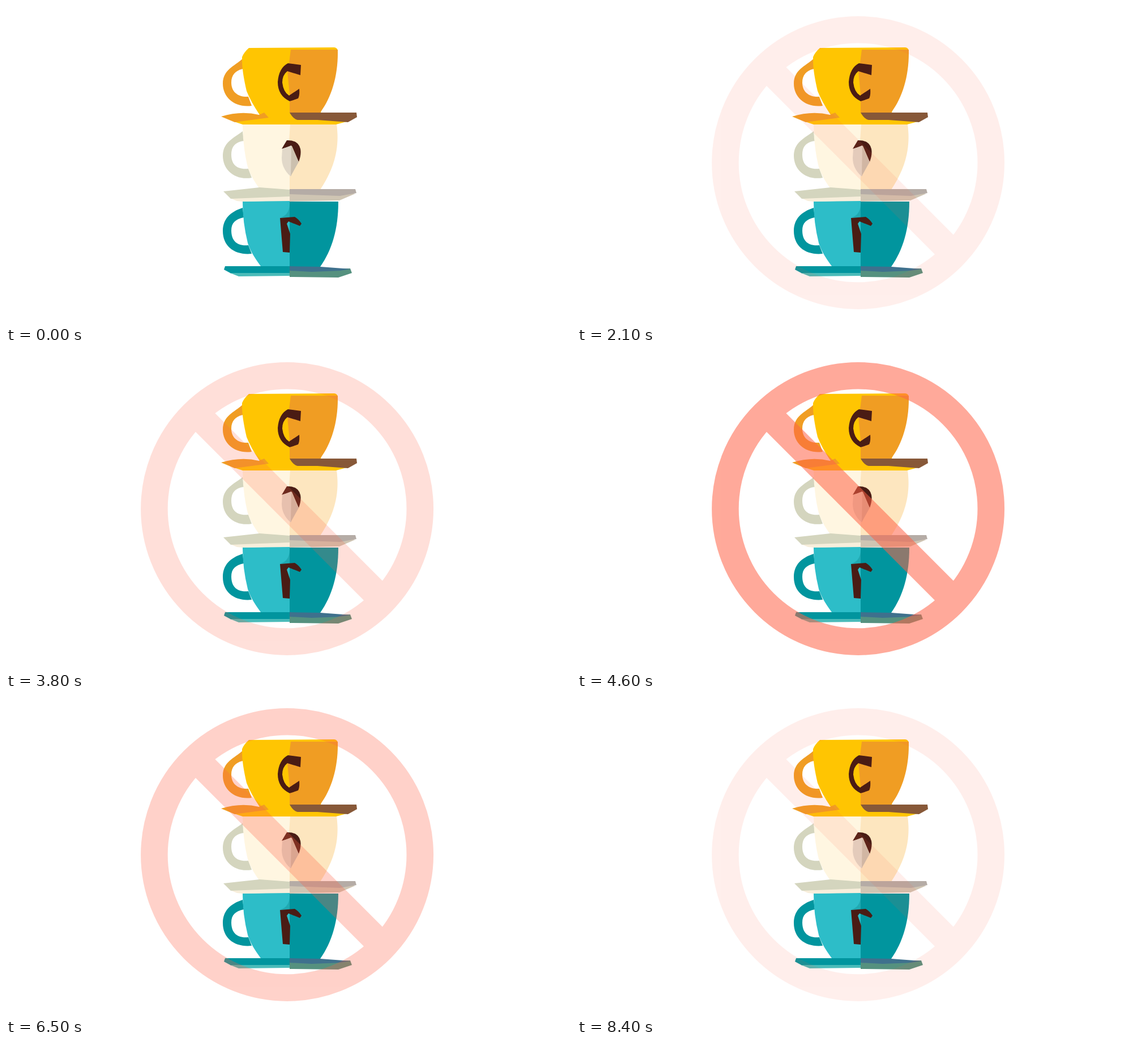
Write an HTML page that moves like this. It is 998 px wide and 561 px high and loops after 8500 ms.

```html
<!DOCTYPE html>
<html lang="en">
<head>
<meta charset="utf-8">
<title>Stacked cups</title>
<style>
  html, body { margin: 0; width: 100%; height: 100%; overflow: hidden; background: #fff; }
  svg { display: block; width: 100%; height: 100%; }
  .orange { fill: #f09d23; }
  .yellow { fill: #ffc502; }
  .sand { fill: #d4d5be; }
  .teal { fill: #01959e; }
  .dark { fill: #4a1c14; }
  #sign { fill: none; stroke: #ff6347; stroke-width: 47.6; opacity: 0; }
</style>
</head>
<body>
<svg viewBox="0 0 998 561">
  <!-- teal cup -->
  <path class="teal" d="M418 356C396 363 383 376 383 397C383 425 405 440 434 437L428 422C408 424 398 414 398 396C398 383 405 376 420 373Z"/>
  <path fill="#2dbdc8" d="M418 345L501 343V459H450Q432 435 427 418Q418 382 418 345Z"/>
  <path fill="#20a9b2" d="M501 350V374L485 373Q500 369 501 350Z"/>
  <path class="teal" d="M501 345H587C587 393 576 430 555 460H501Z"/>
  <path class="dark" d="M484 374L510 372Q517 376 522 384L519 388L499 380L496 384L502 402L501 435L489 434Z"/>
  <path class="teal" d="M387 459H501V472H398L385 465Z"/>
  <path fill="#4abbb9" d="M396 471H501V476L411 477Z"/>
  <path fill="#55917f" d="M501 466L608 463L611 471L587 479L501 478Z"/>
  <path fill="#3f718d" d="M501 459L555 460L609 464L590 467L540 469L501 467Z"/>

  <!-- cream cup -->
  <path class="sand" d="M418 221C404 232 383 240 383 264C383 290 405 308 434 303L428 287C408 289 398 280 398 262C398 248 405 240 420 238Z"/>
  <path fill="#fff6e1" d="M418 209H503V324H449Q430 298 426 280Q418 245 418 209Z"/>
  <path fill="#fde6bf" d="M502 209H584C590 252 579 288 555 324H501V300L504 250L500 238Z"/>
  <path class="dark" d="M496 237Q516 236 520 252Q522 262 517 275L505 247L487 252Z"/>
  <path fill="#e1d8c9" d="M488 252L504 246V300H502Q487 286 487 268Z"/>
  <path fill="#ccc0ae" d="M504 246L517 275L503 300Z"/>
  <path fill="#f7eedb" d="M396 339L501 335V344L418 345L408 344Z"/>
  <path class="sand" d="M384 327L448 320L501 324V336L397 340Z"/>
  <path fill="#cfc5b3" d="M501 331L617 331L589 343L501 345Z"/>
  <path fill="#b5aca6" d="M501 323H617L619 330L590 335L501 332Z"/>

  <!-- yellow cup -->
  <path class="orange" d="M418 93C404 106 383 112 383 137C383 162 405 180 434 176L428 160C410 161 398 152 398 135C398 122 405 114 418 111Z"/>
  <path class="yellow" d="M429 74L580 73Q586 74 586 80L556 188L605 203L583 209H418L403 204L440 192H448Q432 168 425 150Q416 112 417 90Q420 82 429 74Z"/>
  <path class="orange" d="M503 77H586C587 121 576 160 555 188H501V156L497 115L500 101Z"/>
  <path class="dark" d="M498 101L521 104L520 122L497 115Q488 122 488 135Q490 152 500 158L518 146Q519 158 516 163Q508 166 501 168Q480 158 480 134Q482 109 498 101Z"/>
  <path class="orange" d="M380 195Q415 184 447 192L456 188L464 197L404 205Z"/>
  <path fill="#875838" d="M501 188H619L620 196L604 205L550 201L515 201Q507 199 501 188Z"/>

  <!-- ban sign -->
  <g id="sign">
    <circle cx="496.6" cy="276.4" r="234.7"/>
    <path d="M335 107.3L660 432.3"/>
  </g>
</svg>
<script>
  const STEP = 100, LOOP = 8500;
  // [step, opacity] turning points of the fade
  const FADE = [[0, 0], [10.5, 1], [20, 0], [30, 1], [40, 0], [51, 1], [62, 0], [72.5, 1], [83, 0], [93, 1]];
  const sign = document.getElementById('sign');

  function opacityAt(step) {
    const i = FADE.findIndex(([s]) => s > step);
    const [s0, a] = FADE[i - 1], [s1, b] = FADE[i];
    return a + (b - a) * (step - s0) / (s1 - s0);
  }

  function draw() {
    const step = Math.floor(performance.now() % LOOP / STEP);
    sign.style.opacity = opacityAt(step);
    requestAnimationFrame(draw);
  }
  draw();
</script>
</body>
</html>
```
